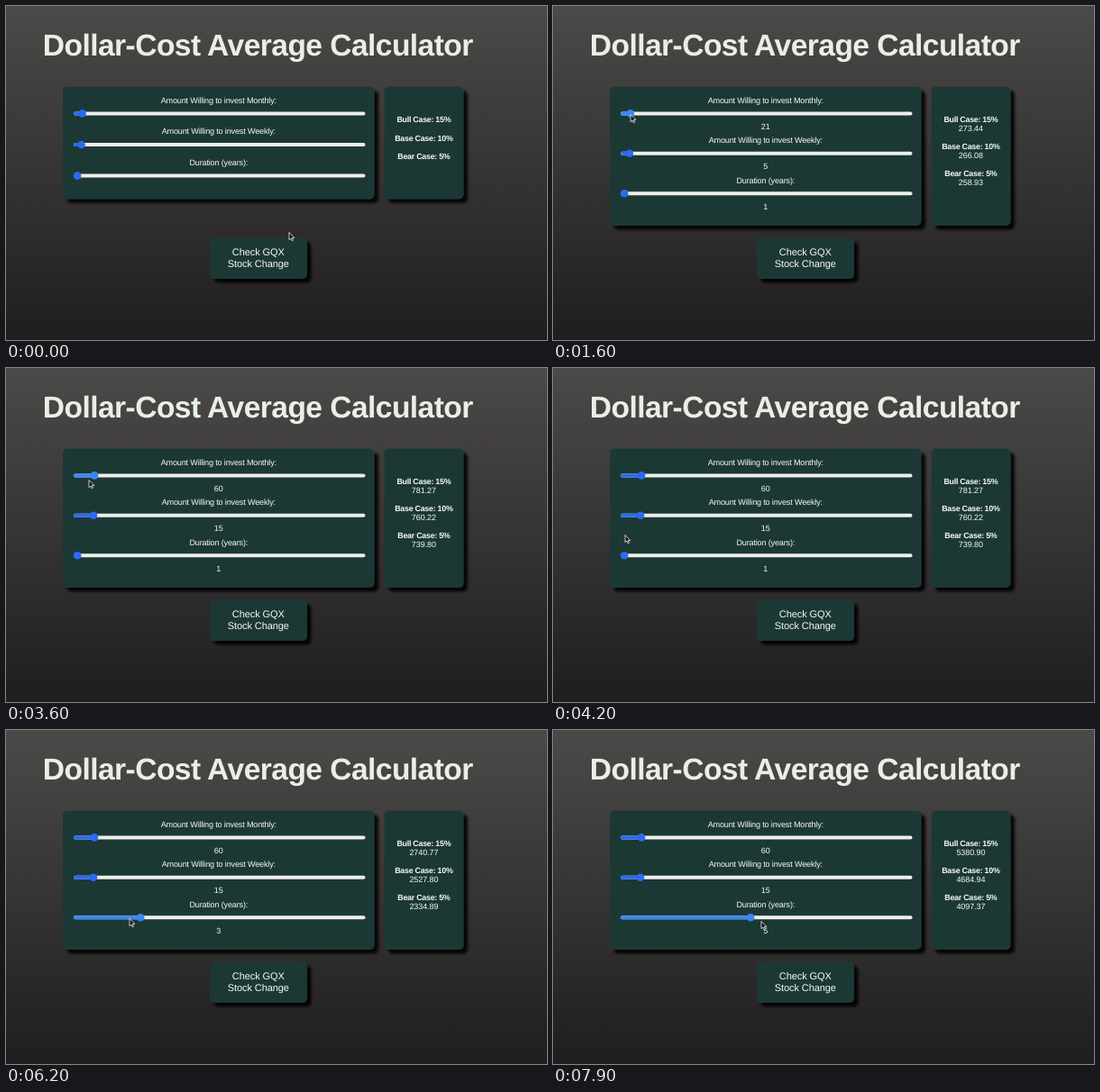
Write an HTML page that moves like this. It is 600 by 371 pixels and loops after 8000 ms.

```html
<!DOCTYPE html>
<html lang="en">
<head>
<meta charset="utf-8">
<title>Dollar-Cost Average Calculator</title>
<style>
html, body { margin: 0; width: 100%; height: 100%; overflow: hidden; background: #201d1f; }
svg { display: block; width: 100vw; height: 100vh; }
text { font-family: "Liberation Sans", Arial, sans-serif; fill: #f6faf6; text-anchor: middle; text-rendering: geometricPrecision; }
.title { font-size: 33.6px; font-weight: bold; letter-spacing: -.56px; fill: #e8efe6; }
.label { font-size: 9.1px; letter-spacing: -.17px; }
.case { font-size: 8.9px; font-weight: bold; letter-spacing: -.27px; }
.number { font-size: 9px; letter-spacing: -.08px; }
.button { font-size: 11px; letter-spacing: -.08px; }
.card { fill: #1e3836; filter: url(#shadow); }
</style>
</head>
<body>
<svg id="stage" viewBox="0 0 600 371">
  <defs>
    <linearGradient id="sky" x2="0" y2="1">
      <stop stop-color="#4c4a48"/>
      <stop offset="1" stop-color="#201d1f"/>
    </linearGradient>
    <filter id="shadow" x="-10%" y="-10%" width="130%" height="140%">
      <feDropShadow dx="4.5" dy="4.5" stdDeviation="1.7" flood-color="#000" flood-opacity=".9"/>
    </filter>
  </defs>
  <rect width="600" height="371" fill="url(#sky)"/>
</svg>
<script>
const LOOP = 8000, STEP = 100;
const FIRST_INPUT = 1300, DURATION_PRESS = 5400;
const LEFT = 79.2, CENTER = 235.8;
const BLUE = '#2a6af3', BRIGHT = '#3a86f5';
const stage = document.getElementById('stage');

// Pointer path: time, x, y
const path = [
  [0, 314, 252], [100, 300, 246], [300, 190, 186], [500, 104, 136], [600, 92, 128],
  [800, 87, 121], [1700, 86, 121], [2600, 96, 122], [3000, 98, 122], [3400, 97, 122],
  [3600, 92, 125], [3900, 83, 160], [4200, 80, 186], [4600, 79, 204], [5200, 79, 208],
  [5500, 83, 209], [6200, 137, 210], [6300, 147, 211], [7200, 186, 212], [7900, 231, 213]
];

// Monthly amount: time, dollars
const deposits = [[0, 17], [1200, 17], [1300, 21], [1700, 21], [2600, 54], [3000, 60], [8000, 60]];

function add(tag, attrs, content = '') {
  const el = document.createElementNS('http://www.w3.org/2000/svg', tag);
  for (const key in attrs) el.setAttribute(key, attrs[key]);
  el.textContent = content;
  return stage.appendChild(el);
}

const card = (x, y, width, height) => add('rect', { class: 'card', x, y, width, height, rx: 5 });
const label = (cls, x, y, content) => add('text', { class: cls, x, y }, content);

function slider(name) {
  const bar = { x: 75, height: 4, rx: 2 };
  return {
    label: label('label', CENTER, 0, name),
    track: add('rect', { ...bar, width: 323.5, fill: '#eeeeeb' }),
    fill: add('rect', bar),
    thumb: add('circle', { r: 4.3 }),
    value: label('number', CENTER, 0)
  };
}

function setSlider(s, top, x, value, hover) {
  const color = hover ? BRIGHT : BLUE;
  s.label.setAttribute('y', top);
  s.track.setAttribute('y', top + 9.7);
  s.fill.setAttribute('y', top + 9.7);
  s.fill.setAttribute('width', x - 75);
  s.fill.setAttribute('fill', color);
  s.thumb.setAttribute('cx', x);
  s.thumb.setAttribute('cy', top + 11.7);
  s.thumb.setAttribute('fill', color);
  s.value.setAttribute('y', top + 29.2);
  s.value.textContent = value;
}

label('title', 279.3, 55, 'Dollar-Cost Average Calculator');
const panels = [card(63, 89.5, 345.5, 125), card(419.5, 89.5, 88, 125)];
card(226, 257.5, 108, 45.5);
label('button', 279.8, 277.3, 'Check GQX');
label('button', 279.8, 290, 'Stock Change');

const monthly = slider('Amount Willing to invest Monthly:');
const weekly = slider('Amount Willing to invest Weekly:');
const duration = slider('Duration (years):');

const cases = [['Bull', 15], ['Base', 10], ['Bear', 5]].map(([name, rate]) => ({
  rate,
  heading: label('case', 463.4, 0, `${name} Case: ${rate}%`),
  value: label('number', 463.4, 0)
}));

const pointer = add('path', {
  d: 'M0 0V8.2L1.9 6.5L3.2 9.3L4.5 8.7L3.2 6H5.8Z',
  fill: '#111', stroke: '#f2f2f2', 'stroke-width': .8, 'stroke-linejoin': 'round'
});

// Linear interpolation through keys of the form [time, ...values]
function sample(keys, t) {
  const i = Math.max(1, keys.findIndex(key => key[0] >= t));
  const [t0, ...from] = keys[i - 1], [t1, ...to] = keys[i];
  return from.map((v, n) => v + (to[n] - v) * (t - t0) / (t1 - t0));
}

// Future value of monthly deposits made at the start of each month
function futureValue(amount, rate, years) {
  const r = rate / 1200;
  return amount * ((1 + r) ** (12 * years) - 1) / r * (1 + r);
}

function render(t) {
  const [x, y] = sample(path, t);
  const active = t >= FIRST_INPUT;
  const amount = Math.round(sample(deposits, t)[0]);
  const perWeek = Math.round(amount / 4);
  const years = t >= DURATION_PRESS ? Math.max(1, Math.round(1 + (x - LEFT) / 35)) : 1;
  const pitch = active ? 44.4 : 34.6;
  const show = value => active ? value : '';

  panels.forEach(p => p.setAttribute('height', active ? 154.5 : 125));
  setSlider(monthly, 107.7, LEFT + amount * .3145, show(amount), t >= 700 && t < 3700);
  setSlider(weekly, 107.7 + pitch, 78.7 + perWeek * 1.22, show(perWeek), false);
  setSlider(duration, 107.7 + 2 * pitch, LEFT + (years - 1) * 35, show(years), t >= 4600);

  cases.forEach((c, i) => {
    const top = 129 + i * (active ? 30.2 : 20.5);
    c.heading.setAttribute('y', top);
    c.value.setAttribute('y', top + 9.7);
    c.value.textContent = show(futureValue(amount, c.rate, years).toFixed(2));
  });
  pointer.setAttribute('transform', `translate(${x} ${y - .5})`);
}

let start;
function tick(now) {
  start ??= now;
  render(Math.floor((now - start) % LOOP / STEP) * STEP);
  requestAnimationFrame(tick);
}
render(0);
requestAnimationFrame(tick);
</script>
</body>
</html>
```
